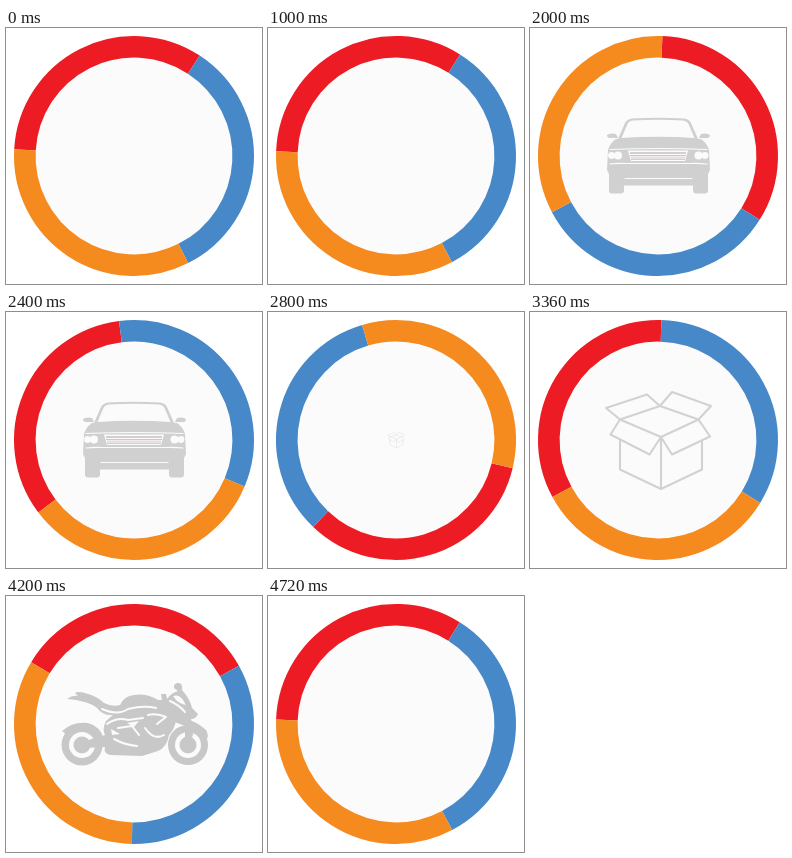
Recreate the animation shown at these times as an HTML page. Size 256 by 256 pixels, loop 4.8 s.

```html
<!DOCTYPE html>
<html lang="en">
<head>
<meta charset="utf-8">
<title>Spinning ring with icons</title>
<style>
html, body { margin: 0; width: 100%; height: 100%; overflow: hidden; background: #fff; }
svg { display: block; width: 100vw; height: 100vh; }
.paper { fill: #fbfbfb; }
.cut { fill: none; stroke: #fbfbfb; stroke-linecap: round; stroke-linejoin: round; }
.line { fill: none; stroke: #d2d2d2; stroke-width: 2.1; stroke-linejoin: round; stroke-linecap: round; }
</style>
</head>
<body>
<svg viewBox="0 0 256 256">
  <circle class="paper" cx="128" cy="128" r="100"/>
  <g id="ring" fill="none" stroke-width="21.6"></g>

  <g id="car" fill="#d0d0d0">
    <path fill-rule="evenodd" d="M88 111 L95 95 Q97 91 102 90.500 Q128 89 154 90.500 Q159 91 161 95 L168 111 Z
      M91.500 110 Q128 107.500 164.500 110 L158.500 96 Q157.500 93 153 92.500 Q128 91 103 92.500 Q98.500 93 97.500 96 Z"/>
    <path d="M77 107 Q80 104.500 86 106 L88 110 H80 Q77 110 77 107 Z M180 107 Q177 104.500 171 106 L169 110 H177 Q180 110 180 107 Z"/>
    <path d="M86 111 Q128 107.500 171 111 Q177 115 179 122 L180 142 L178 146 V162 Q178 165.500 175 165.500 H166 Q163 165.500 163 162 V157.500
      H94 V162 Q94 165.500 91 165.500 H82 Q79 165.500 79 162 V146 L77 142 L78 122 Q80 115 86 111 Z"/>
    <path class="cut" stroke-width="1.200" d="M80 121.500 Q128 119.500 177 121.500 M80 136 Q87 135 96 135.500 H160 Q169 135 177 136 M95 150.500 H162"/>
    <path class="paper" d="M98 122.500 H158 L155 133 H101 Z"/>
    <path d="M100 124 H156 V126 H100 Z M101 130.500 H155 V132 H101 Z"/>
    <path fill="#b9cbe0" d="M100 127 H156 V128 H100 Z"/>
    <path fill="#e9b9b5" d="M101 128.800 H155 V129.600 H101 Z"/>
    <g class="paper">
      <circle cx="81.500" cy="127.500" r="3.400"/><circle cx="88" cy="127.500" r="4"/>
      <circle cx="168.500" cy="127.500" r="4"/><circle cx="175" cy="127.500" r="3.400"/>
    </g>
  </g>

  <g id="box" class="line">
    <path d="M90 107.500 L76 96 L117 82.500 L130 94 Z"/>
    <path d="M130 94 L142 80 L181 94 L168.500 107.500 Z"/>
    <path d="M90 107.500 L80.500 122.500 L119.500 142.500 L131 125 Z"/>
    <path d="M131 125 L142 142.500 L180 124.500 L168.500 107.500 Z"/>
    <path d="M90 128 V157.500 L131 177 L172 157.500 V129 M131 125 V177"/>
  </g>

  <g id="bike" fill="#c8c8c8">
    <circle cx="76" cy="149" r="20.500"/><circle cx="182" cy="149" r="20"/>
    <g class="paper">
      <circle cx="76" cy="149" r="13"/><circle cx="182" cy="149" r="13"/>
    </g>
    <circle cx="76" cy="149" r="8.500"/><circle cx="182" cy="149" r="8.500"/>
    <path d="M61 103 Q66 99 72 100 L69 97 Q72 95 79 97 Q91 100 98 107 Q106 111 114 109 Q118 100 128 99 Q140 97 152 104
      L156 104 L155 98 L160 98 L161 103 Q165 97 172 95 L168 92 Q167 87 173 87 Q177 88 176 94 Q184 103 186 112
      L192 118 Q190 123 185 123 L188 135 L184 149 L179 149 L179 130 L170 125 Q168 134 163 139 Q161 151 152 155
      L136 160 L104 159 Q97 157 99 151 L78 152 L76 146 L99 139 Q96 133 100 125 L107 119 Q97 120 91 112 Q83 105 61 103 Z"/>
    <path d="M56 135 Q67 125 82 127 Q94 130 98 143 L94 146 Q90 135 79 133 Q69 131 60 138 Z"/>
    <path d="M166 125 Q184 119 200 134 Q203 139 201 143 Q194 130 179 130 Z"/>
    <path class="cut" stroke-width="2" d="M96 113 Q112 120 122 113 Q138 109 150 112 M101 128 Q111 121 122 124 L137 122
      M112 132 L126 130 L133 139 M108 143 Q119 149 131 150 M142 119 Q151 117 160 121 L151 128 M139 132 Q148 145 158 139 M164 105 Q173 109 179 116"/>
    <path class="paper" d="M167 100 Q173 98 177 104 L180 109 Q172 108 167 100 Z M121 127 L133 125 L128 131 Z M105 133 L114 138 L106 139 Z"/>
  </g>
</svg>
<script>
const LOOP = 4800, STEP = 40, POP = 335;
const $ = id => document.getElementById(id);

// time in ms, angle at which the red third begins
const turns = [[0, 273.2], [1160, 272.1], [2000, 2.1], [2800, -256.4],
               [3360, -478.4], [4200, -779], [4283, -807.9], [LOOP, -807.9]];
const shows = [["car", 1660, 2747], ["box", 2747, 3733], ["bike", 3733, 4720]];

const ring = $("ring");
const at = deg => {
  const r = deg * Math.PI / 180;
  return (109.2 * Math.sin(r)).toFixed(2) + " " + (-109.2 * Math.cos(r)).toFixed(2);
};
["#ed1c24", "#4788c8", "#f58a1f"].forEach((color, i) => {
  const arc = document.createElementNS("http://www.w3.org/2000/svg", "path");
  arc.setAttribute("d", `M${at(i * 120)} A109.2 109.2 0 0 1 ${at(i * 120 + 120)}`);
  arc.setAttribute("stroke", color);
  ring.append(arc);
});

function angle(t) {
  const i = turns.findIndex(p => p[0] > t);
  const [t0, a0] = turns[i - 1], [t1, a1] = turns[i];
  return a0 + (a1 - a0) * (t - t0) / (t1 - t0);
}

function draw(t) {
  ring.setAttribute("transform", `translate(128 128) rotate(${angle(t)})`);
  for (const [id, from, to] of shows) {
    const size = Math.min(1, (t - from) / POP, (to - t) / POP);
    const icon = $(id);
    icon.style.display = size > 0 ? "" : "none";
    icon.setAttribute("transform", `translate(128 128) scale(${Math.max(0, size)}) translate(-128 -128)`);
  }
}

const start = performance.now();
function tick() {
  const t = (performance.now() - start) % LOOP;
  draw(Math.floor(t / STEP) * STEP);
  requestAnimationFrame(tick);
}
tick();
</script>
</body>
</html>
```
